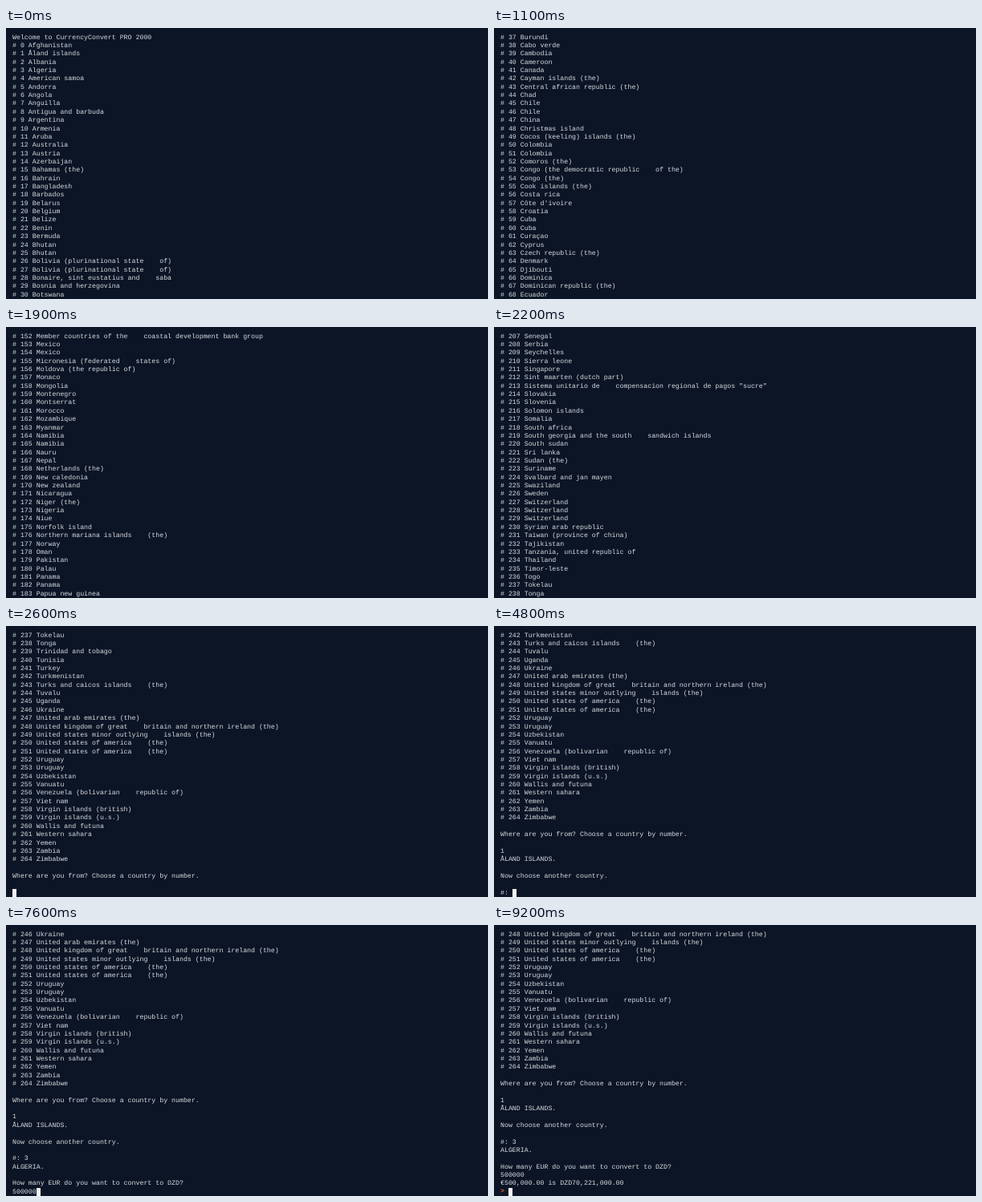
Write an HTML page that moves like this. It is 600 px wide and 338 px high and loops after 9.6 s.

```html
<!DOCTYPE html>
<html lang="en">
<head>
<meta charset="utf-8">
<title>Currency converter</title>
<style>
  html, body { margin: 0; width: 100%; height: 100%; overflow: hidden; background: #0c1526; }
  #term {
    --ch: 4.96px;
    --row: 10.36px;
    position: absolute; left: 8px; top: 6.9px; width: 592px; height: 332px;
    font: 8.266px/var(--row) "Liberation Mono", "Courier New", monospace;
    text-rendering: geometricPrecision;
    color: #d8dde2;
  }
  #text { position: absolute; top: 0.7px; margin: 0; font: inherit; white-space: pre; }
  #cursor, #prompt { position: absolute; top: calc(31 * var(--row)); height: var(--row); }
  #cursor { width: var(--ch); background: #f6f7f8; }
  #prompt { left: 0; color: #dc5f3c; font-weight: bold; }
</style>
</head>
<body>
<div id="term"><pre id="text"></pre><span id="prompt">&gt;</span><span id="cursor"></span></div>
<script>
const LOOP = 9600, STEP = 100, ROWS = 32, CH = 4.96;
const LIST_END = 2400, PROMPT_AT = 8300;

// "|" separates entries, "~" is a wide gap, "*n" repeats an entry
const countries = `Afghanistan|Åland islands|Albania|Algeria|American samoa|Andorra|Angola|Anguilla|Antigua and barbuda|Argentina|Armenia|Aruba|Australia|Austria|Azerbaijan|Bahamas (the)|Bahrain|Bangladesh|Barbados|Belarus|Belgium|Belize|Benin|Bermuda|Bhutan*2|Bolivia (plurinational state~of)*2|Bonaire, sint eustatius and~saba|Bosnia and herzegovina|Botswana|Bouvet island|Brazil|British indian ocean territory~(the)|Brunei darussalam|Bulgaria|Burkina faso|Burundi|Cabo verde|Cambodia|Cameroon|Canada|Cayman islands (the)|Central african republic (the)|Chad|Chile*2|China|Christmas island|Cocos (keeling) islands (the)|Colombia*2|Comoros (the)|Congo (the democratic republic~of the)|Congo (the)|Cook islands (the)|Costa rica|Côte d'ivoire|Croatia|Cuba*2|Curaçao|Cyprus|Czech republic (the)|Denmark|Djibouti|Dominica|Dominican republic (the)|Ecuador|Egypt|El salvador*2|Equatorial guinea|Eritrea|Estonia|Ethiopia|European union|Falkland islands (the)~[malvinas]|Faroe islands (the)|Fiji|Finland|France|French guiana|French polynesia|French southern territories~(the)|Gabon|Gambia (the)|Georgia|Germany|Ghana|Gibraltar|Greece|Greenland|Grenada|Guadeloupe|Guam|Guatemala|Guernsey|Guinea|Guinea-bissau|Guyana|Haiti*2|Heard island and mcdonald~islands|Holy see (the)|Honduras|Hong kong|Hungary|Iceland|India|Indonesia|Interregional reserves fund (irf)|Iran (islamic republic of)|Iraq|Ireland|Isle of man|Israel|Italy|Jamaica|Japan|Jersey|Jordan|Kazakhstan|Kenya|Kiribati|Korea (the democratic people's~republic of)|Korea (the republic of)|Kuwait|Kyrgyzstan|Lao people's democratic~republic (the)|Latvia|Lebanon|Lesotho*2|Liberia|Libya|Liechtenstein|Lithuania|Luxembourg|Macao|Macedonia (the former~yugoslav republic of)|Madagascar|Malawi|Malaysia|Maldives|Mali|Malta|Marshall islands (the)|Martinique|Mauritania|Mauritius|Mayotte|Member countries of the~coastal development bank group|Mexico*2|Micronesia (federated~states of)|Moldova (the republic of)|Monaco|Mongolia|Montenegro|Montserrat|Morocco|Mozambique|Myanmar|Namibia*2|Nauru|Nepal|Netherlands (the)|New caledonia|New zealand|Nicaragua|Niger (the)|Nigeria|Niue|Norfolk island|Northern mariana islands~(the)|Norway|Oman|Pakistan|Palau|Panama*2|Papua new guinea|Paraguay|Peru|Philippines (the)|Pitcairn|Poland|Portugal|Puerto rico|Qatar|Réunion|Romania|Russian federation (the)|Rwanda|Saint barthélemy|Saint helena, ascension and~tristan da cunha|Saint kitts and nevis|Saint lucia|Saint martin (french part)|Saint pierre and miquelon|Saint vincent and the~grenadines|Samoa|San marino|Sao tome and principe|Saudi arabia|Senegal|Serbia|Seychelles|Sierra leone|Singapore|Sint maarten (dutch part)|Sistema unitario de~compensacion regional de pagos "sucre"|Slovakia|Slovenia|Solomon islands|Somalia|South africa|South georgia and the south~sandwich islands|South sudan|Sri lanka|Sudan (the)|Suriname|Svalbard and jan mayen|Swaziland|Sweden|Switzerland*3|Syrian arab republic|Taiwan (province of china)|Tajikistan|Tanzania, united republic of|Thailand|Timor-leste|Togo|Tokelau|Tonga|Trinidad and tobago|Tunisia|Turkey|Turkmenistan|Turks and caicos islands~(the)|Tuvalu|Uganda|Ukraine|United arab emirates (the)|United kingdom of great~britain and northern ireland (the)|United states minor outlying~islands (the)|United states of america~(the)*2|Uruguay*2|Uzbekistan|Vanuatu|Venezuela (bolivarian~republic of)|Viet nam|Virgin islands (british)|Virgin islands (u.s.)|Wallis and futuna|Western sahara|Yemen|Zambia|Zimbabwe`
  .split("|")
  .flatMap(entry => {
    const [name, count = 1] = entry.split("*");
    return Array(+count).fill(name.replace("~", "    "));
  });

const listing = ["Welcome to CurrencyConvert PRO 2000", ...countries.map((name, i) => `# ${i} ${name}`)];

// [time, first visible line] while the list is printed
const scroll = [[0, 0], [200, 0], [300, 18], [900, 18], [1500, 79], [2200, 208], [LIST_END, 238]];

// [time, text added to the terminal]
const session = [
  [LIST_END, "\n\nWhere are you from? Choose a country by number.\n\n"],
  [4100, "1"],
  [4400, "\nÅLAND ISLANDS.\n\nNow choose another country.\n\n#: "],
  [5500, "3"],
  [5800, "\nALGERIA.\n\nHow many EUR do you want to convert to DZD?\n"],
  [6500, "5"], [6700, "0"], [6800, "0"], [6900, "0"], [7000, "0"], [7100, "0"],
  [7900, "\n"],
  [PROMPT_AT, "€500,000.00 is DZD70,221,000.00\n  "]
];

const [text, prompt, cursor] = ["text", "prompt", "cursor"].map(id => document.getElementById(id));

function topLine(t) {
  const i = scroll.findIndex(([time]) => time > t);
  const [t0, a] = scroll[i - 1], [t1, b] = scroll[i];
  return Math.round(a + (b - a) * (t - t0) / (t1 - t0));
}

function visibleRows(t) {
  if (t < LIST_END) {
    const top = topLine(t);
    return listing.slice(top, top + ROWS);
  }
  const added = session.filter(([time]) => time <= t).map(([, s]) => s).join("");
  return (listing.join("\n") + added).split("\n").slice(-ROWS);
}

function draw(t) {
  const rows = visibleRows(t);
  text.textContent = rows.join("\n");
  cursor.hidden = t < LIST_END;
  cursor.style.left = rows[ROWS - 1].length * CH + "px";
  prompt.hidden = t < PROMPT_AT;
}

const start = performance.now();
let shown = -1;

function tick() {
  const t = Math.floor((performance.now() - start) % LOOP / STEP) * STEP;
  if (t !== shown) draw(shown = t);
  requestAnimationFrame(tick);
}
tick();
</script>
</body>
</html>
```
